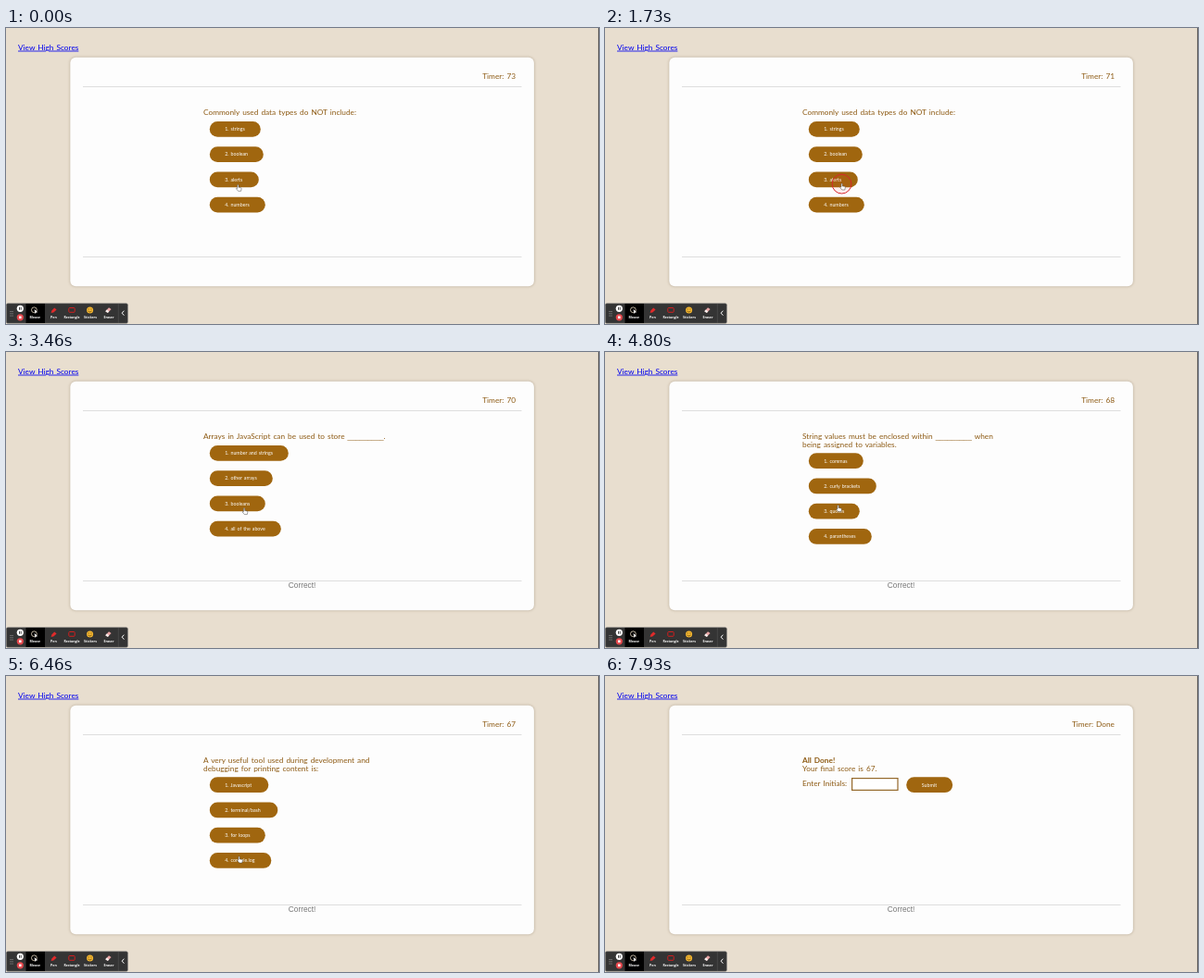
Recreate the animation shown at these times as an HTML page. Size 640 by 320 pixels, loop 8000 ms.

```html
<!DOCTYPE html>
<html lang="en">
<head>
<meta charset="utf-8">
<title>Quiz</title>
<style>
  html, body { margin: 0; width: 100%; height: 100%; overflow: hidden; background: #e8decf; }
  svg { display: block; width: 640px; height: 320px; }
  text { font: 8.29px Lato, sans-serif; word-spacing: .11em; fill: #8d5a13; white-space: pre; }
  .link { fill: #00e; text-decoration: underline; }
  .gap { font: 7.8px "Liberation Sans", sans-serif; }
  .bold { font-weight: bold; }
  .reply { font: 8.3px "Liberation Sans", Arial, sans-serif; fill: #777; text-anchor: middle; }
  .btn { fill: #a0660f; }
  .label { font-size: 5.3px; fill: #fff; }
  .tool { font: bold 3.5px "Open Sans", sans-serif; fill: #fff; text-anchor: middle; word-spacing: 0; }
  .card { filter: drop-shadow(0 .8px 1.4px rgba(70, 50, 20, .32)); }
</style>
</head>
<body>
<svg viewBox="0 0 640 320">
  <rect width="640" height="320" fill="#e8decf"/>
  <text class="link" x="13" y="23.6">View High Scores</text>
  <rect class="card" x="69.3" y="31.8" width="500.6" height="247.4" rx="6" fill="#fdfdfd"/>
  <path d="M83 63.5H556.5M83 247.5H556.5" stroke="#dedede"/>
  <text id="timer" x="550" y="55" text-anchor="end"></text>
  <g id="scenes"></g>
  <text id="reply" class="reply" x="319.6" y="255">Correct!</text>
  <rect x="639.3" width=".7" height="320" fill="#333"/>

  <g id="toolbar">
    <rect x=".4" y="297.8" width="131" height="21.4" rx="1.5" fill="#343434" stroke="#777" stroke-width=".5"/>
    <rect x="21.5" y="298" width="20.5" height="21" fill="#000"/>
    <path d="M121.3 298V319" stroke="#555" stroke-width=".6"/>
    <path d="M5 306V312M7 306V312" stroke="#aaa" stroke-width=".9" stroke-dasharray="1 1.3"/>
    <circle cx="15.3" cy="303.3" r="3.6" fill="#fff"/>
    <path d="M14.5 301.8V304.8M16.2 301.8V304.8" stroke="#333" stroke-width=".9"/>
    <circle cx="15.3" cy="312.8" r="3.6" fill="#e5484d"/>
    <rect x="14" y="311.5" width="2.6" height="2.6" fill="#fff"/>
    <circle cx="30.4" cy="304.8" r="2.9" fill="none" stroke="#e8d9c0" stroke-width=".8"/>
    <path d="M30.6 304L34.2 307.2L32.4 307.4L31.4 309Z" fill="#fff"/>
    <path d="M48.6 308L49.4 305.6L52.2 302.4L54.6 304.6L51.4 307.4Z" fill="#e02b2b"/>
    <rect x="67.8" y="302.5" width="6.4" height="4.8" rx=".8" fill="none" stroke="#d11f1f" stroke-width="1"/>
    <circle cx="90.6" cy="305" r="3.5" fill="#f4b731"/>
    <path d="M89.3 303.3V304.5M91.9 303.3V304.5M88.7 306Q90.6 308 92.5 306" stroke="#5a3b08" stroke-width=".7" fill="none"/>
    <path d="M107.3 306.2L111 302.3L113.6 304L109.8 308Z" fill="#e9a5a5"/>
    <path d="M107.3 306.2L108.8 304.6L111.3 306.4L109.8 308Z" fill="#f4f0ee"/>
    <path d="M127.4 305.7L125.2 308.2L127.4 310.7" fill="none" stroke="#fff" stroke-width="1"/>
    <text class="tool" x="31.3" y="313.6">Mouse</text>
    <text class="tool" x="51.4" y="313.6">Pen</text>
    <text class="tool" x="71" y="313.6">Rectangle</text>
    <text class="tool" x="91" y="313.6">Stickers</text>
    <text class="tool" x="111" y="313.6">Eraser</text>
  </g>

  <circle id="ring" r="10.4" fill="#f33" fill-opacity=".08" stroke="#d8262c" stroke-width="1"/>
  <path id="hand" d="M-.6 .5Q0 -.5 .7 .5V2.9L3 3.3Q4 3.6 3.8 4.6L3.3 7H.3L-1.9 4.4Q-1.6 3.4 -.6 4.2Z"
        fill="#fff" stroke="#444" stroke-width=".5" stroke-linejoin="round"/>
</svg>
<script>
const LOOP = 8000, RING = 240;

// Start time, question lines, then [answer, button width]
const quiz = [
  [0, ['Commonly used data types do NOT include:'],
    [['strings', 55], ['boolean', 58], ['alerts', 53], ['numbers', 60]]],
  [1880, ['The condition in an if / else statement is enclosed with', '________.'],
    [['quotes', 55], ['curly brackets', 73], ['parantheses', 68], ['square brackets', 77]]],
  [2880, ['Arrays in JavaScript can be used to store _________.'],
    [['number and strings', 85], ['other arrays', 68], ['booleans', 60], ['all of the above', 77]]],
  [4200, ['String values must be enclosed within _________ when', 'being assigned to variables.'],
    [['commas', 59], ['curly brackets', 73], ['quotes', 55], ['parantheses', 68]]],
  [5060, ['A very useful tool used during development and', 'debugging for printing content is:'],
    [['Javascript', 63.5], ['terminal/bash', 73.5], ['for loops', 60], ['console.log', 66.5]]]
];
const END = 6590;
const clicks = [1650, 2660, 4010, 4870, 6480];
const TICK = 1000, FIRST_TICK = 600;

// Pointer path: time, x, y
const path = [
  [0, 250.3, 169.3], [300, 250.3, 169.3], [860, 254, 167], [1260, 255.5, 168], [2060, 255.5, 168],
  [2600, 253, 172], [2900, 253, 172], [3300, 257, 168.6], [3500, 257, 168.6], [3900, 255, 189],
  [4250, 255, 189], [4750, 251.5, 165.6], [5150, 251.5, 165.6], [5800, 252, 190],
  [6300, 251.5, 195], [6750, 251.5, 195], [7400, 288, 116]
];

const $ = id => document.getElementById(id);
const text = (x, y, str, cls = '') =>
  `<text x="${x}" y="${y}" class="${cls}">${str.replace(/_+/g, '<tspan class="gap">$&</tspan>')}</text>`;
const button = (x, y, w) =>
  `<rect class="btn" x="${x}" y="${y}" width="${w}" height="16.8" rx="8.4"/>`;

function question([, lines, answers]) {
  const top = 101 + (lines.length - 1) * 8.3;
  return lines.map((s, i) => text(213, 94.4 + i * 8.4, s)).join('') +
    answers.map(([s, w], i) => {
      const y = top + i * 27.25;
      return button(219.8, y, w) + text(236.2, y + 10.2, `${i + 1}. ${s}`, 'label');
    }).join('');
}

const done = text(213, 94.4, 'All Done!', 'bold') +
  text(213, 102.8, 'Your final score is 67.') +
  text(213, 119.4, 'Enter Initials:') +
  '<rect x="266.6" y="110.6" width="49.4" height="12.8" fill="#fff" stroke="#94682a" stroke-width="1.2"/>' +
  button(325.2, 109.3, 50) + text(341.8, 119.5, 'Submit', 'label');

$('scenes').innerHTML = [...quiz.map(question), done].map(s => `<g>${s}</g>`).join('');
const scenes = [...$('scenes').children];
const starts = [...quiz.map(q => q[0]), END];

const show = (el, on) => { el.style.display = on ? '' : 'none'; };

function pointer(t) {
  const i = path.findIndex(p => p[0] > t);
  if (i < 0) return path[path.length - 1].slice(1);
  const [t0, x0, y0] = path[i - 1], [t1, x1, y1] = path[i];
  const k = (t - t0) / (t1 - t0), e = k * k * (3 - 2 * k);
  return [x0 + (x1 - x0) * e, y0 + (y1 - y0) * e];
}

function draw(t) {
  const now = starts.filter(s => s <= t).length - 1;
  scenes.forEach((g, i) => show(g, i === now));
  show($('reply'), now > 0);

  const left = 73 - Math.max(0, Math.floor((t - FIRST_TICK) / TICK) + 1);
  $('timer').textContent = 'Timer: ' + (t < END ? left : 'Done');

  const [x, y] = pointer(t);
  $('hand').setAttribute('transform', `translate(${x} ${y})`);
  show($('hand'), t < 7400);

  const click = clicks.find(c => t >= c && t < c + RING);
  show($('ring'), click !== undefined);
  if (click !== undefined) {
    $('ring').setAttribute('transform', `translate(${x} ${y + .6})`);
    $('ring').style.opacity = Math.min(1, (click + RING - t) / 80);
  }
}

const origin = performance.now();
function frame() {
  draw((performance.now() - origin) % LOOP);
  requestAnimationFrame(frame);
}
frame();
</script>
</body>
</html>
```
